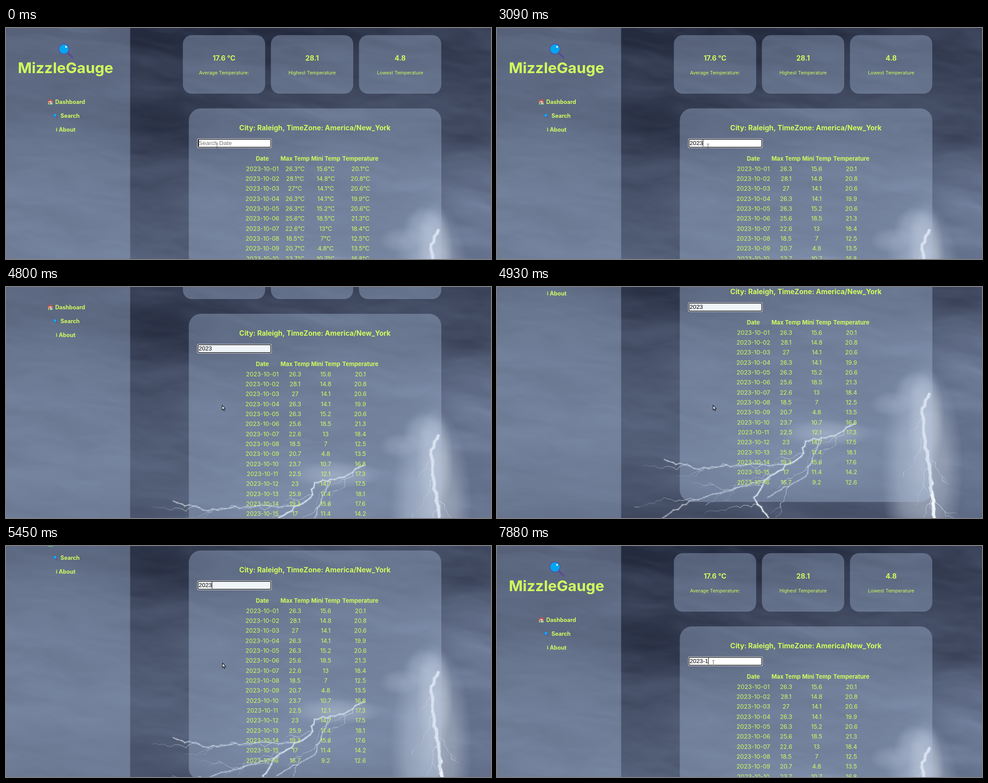
Write an HTML page with a canvas that moves like this. It is 1084 by 517 pixels and loops after 8 s.

```html
<!DOCTYPE html>
<html lang="en">
<head>
<meta charset="utf-8">
<title>MizzleGauge</title>
<style>
html, body { margin: 0; width: 100%; height: 100%; overflow: hidden; background: #39435c; }
canvas { display: block; }
</style>
</head>
<body>
<canvas id="stage" width="1084" height="517"></canvas>
<script>
const W = 1084, H = 517, PAGE_H = 730, LOOP = 8000;
const LIME = '#d2fc5e', GLASS = 'rgba(170,190,220,.37)';
const ctx = document.getElementById('stage').getContext('2d');
const page = document.createElement('canvas');
page.width = W;
page.height = PAGE_H;

// Maximum, minimum and mean of each day
const DAYS = `26.3 15.6 20.1, 28.1 14.8 20.8, 27 14.1 20.6, 26.3 14.1 19.9,
  26.3 15.2 20.6, 25.6 18.5 21.3, 22.6 13 18.4, 18.5 7 12.5,
  20.7 4.8 13.5, 23.7 10.7 16.8, 22.5 12.1 17.3, 23 14.7 17.5,
  25.9 11.4 18.1, 19.3 15.6 17.6, 17 11.4 14.2, 16.7 9.2 12.6`
  .split(',').map(day => day.trim().split(' '));
const COLUMNS = { 'Date': 573, 'Max Temp': 646, 'Mini Temp': 714.5, 'Temperature': 792 };

const TYPED = '2023-1';
const KEY_TIMES = [570, 720, 1250, 1960, 7620, 7880];
const CARET_FLIPS = [1810, 1960, 2520, 3090, 3630, 4150, 4660, 5170, 5600, 6150, 6670, 7190];
const MOVES = [
  { at: 0, scroll: 0, pointer: drawBeam, x: 471, y: 264 },
  { at: 4540, pointer: drawArrow, x: 476, y: 273 },
  { at: 4660, pointer: drawBeam, x: 483, y: 264 },
  { at: 4800, scroll: 120, pointer: drawArrow, y: 265 },
  { at: 4930, scroll: 213 },
  { at: 5450, scroll: 170, x: 484, y: 262 },
  { at: 5600, scroll: 0 },
  { at: 5900, pointer: drawBeam, y: 264 },
  { at: 6420, y: 262 },
  { at: 6940, x: 483, y: 261 }
];

let seed = 11;
const random = () => (seed = (seed * 16807) % 2147483647) / 2147483647;
const mix = (a, b, k) => a + (b - a) * k;
const ease = k => k * k * (3 - 2 * k);

function hash(x, y) {
  let n = Math.imul(x, 374761393) + Math.imul(y, 668265263);
  n = Math.imul(n ^ (n >>> 13), 1274126177);
  return ((n ^ (n >>> 16)) >>> 0) / 4294967296;
}

function noise(x, y) {
  const i = Math.floor(x), j = Math.floor(y), u = ease(x - i), v = ease(y - j);
  return mix(mix(hash(i, j), hash(i + 1, j), u), mix(hash(i, j + 1), hash(i + 1, j + 1), u), v) - .5;
}

// Brightness of the sky: lighter towards the middle and the right, with a few clouds
function skyTone(x, y) {
  const cloud = (cx, cy, rx, ry) => Math.exp(-(((x - cx) / rx) ** 2) - ((y - cy) / ry) ** 2);
  return .07 + .41 * Math.sin(Math.PI * y / 1000) ** 2 + .13 * (x / W) ** 2
    + .11 * cloud(720, 155, 330, 45)
    - .13 * cloud(340, 235, 130, 60)
    - .12 * cloud(1040, 240, 120, 40)
    + .2 * cloud(1050, 410, 130, 130)
    + .2 * cloud(630, 600, 220, 80)
    + .25 * cloud(1060, 690, 110, 110);
}

function paintSky(c) {
  const image = c.createImageData(W, PAGE_H);
  for (let y = 0, p = 0; y < PAGE_H; y++) {
    for (let x = 0; x < W; x++, p += 4) {
      const slant = y - x * .12 + 22 * noise(x / 80, y / 50);
      const wisps = noise(x / 150, slant / 34) * .17 + noise(x / 60, slant / 13) * .1 + noise(x / 24, slant / 7) * .05;
      const k = Math.max(0, skyTone(x, y) + wisps * mix(1, .6, y / PAGE_H));
      image.data[p] = mix(36, 128, k);
      image.data[p + 1] = mix(43, 143, k);
      image.data[p + 2] = mix(63, 173, k);
      image.data[p + 3] = 255;
    }
  }
  c.putImageData(image, 0, 0);
}

function glow(c, x, y, rx, ry, alpha) {
  const g = c.createRadialGradient(0, 0, 0, 0, 0, 1);
  g.addColorStop(0, `rgba(218,226,236,${alpha})`);
  g.addColorStop(.6, `rgba(205,214,228,${alpha * .6})`);
  g.addColorStop(1, 'rgba(190,202,222,0)');
  c.save();
  c.translate(x, y);
  c.scale(rx, ry);
  c.fillStyle = g;
  c.fillRect(-1, -1, 2, 2);
  c.restore();
}

function line(c, x0, y0, x1, y1, width, alpha) {
  c.lineCap = 'round';
  c.lineWidth = width;
  c.strokeStyle = `rgba(240,245,251,${alpha})`;
  c.beginPath();
  c.moveTo(x0, y0);
  c.lineTo(x1, y1);
  c.stroke();
}

// A thin arm that wanders, fades and sometimes splits
function arm(c, x, y, angle, length, alpha) {
  for (let left = length; left > 0; left -= 9) {
    const a = angle + (random() - .5) * 1.5;
    const nx = x + 9 * Math.cos(a), ny = y + 9 * Math.sin(a);
    line(c, x, y, nx, ny, .6 + left / length * .7, alpha * mix(.45, 1, left / length));
    [x, y] = [nx, ny];
    if (random() < .06) arm(c, x, y, angle + (random() - .5) * 1.6, left * .5, alpha * .7);
  }
}

// Jagged channel through key points; arms leave it in the direction `lean`
function bolt(c, points, width, alpha, lean, arms) {
  const joints = [];
  for (let i = 0; i + 1 < points.length; i++) {
    const [x0, y0] = points[i], [x1, y1] = points[i + 1];
    const n = Math.ceil(Math.hypot(x1 - x0, y1 - y0) / 11);
    for (let s = 0; s < n; s++) {
      const jitter = () => s ? (random() - .5) * 6 : 0;
      joints.push([mix(x0, x1, s / n) + jitter(), mix(y0, y1, s / n) + jitter()]);
    }
  }
  joints.push(points[points.length - 1]);
  for (let i = 1; i < joints.length; i++) {
    const w = width * mix(.8, 1.1, random());
    line(c, ...joints[i - 1], ...joints[i], w + 4, alpha * .16);
    line(c, ...joints[i - 1], ...joints[i], w, alpha);
  }
  for (let i = 0; i < arms; i++) {
    const [x, y] = joints[Math.floor((i + .7) / (arms + .5) * joints.length)];
    arm(c, x, y, lean + (random() - .5) * .7, 70 + random() * 70, .6);
  }
}

function paintLightning(c) {
  const { PI } = Math;
  glow(c, 950, 620, 92, 235, .62);
  glow(c, 958, 510, 42, 120, .6);
  glow(c, 935, 445, 48, 46, .35);
  glow(c, 885, 475, 52, 30, .28);
  glow(c, 735, 540, 105, 32, .4);

  bolt(c, [[800, 519], [755, 546], [690, 558]], 2.4, .8, PI * .6, 2);
  bolt(c, [[690, 558], [680, 592], [612, 635], [574, 684], [607, 730]], 2.6, .9, PI * .85, 4);
  bolt(c, [[648, 610], [535, 612], [440, 619], [374, 599]], 1.4, .7, PI, 3);
  bolt(c, [[610, 642], [500, 674], [430, 692], [370, 730]], 1.4, .7, PI * .9, 2);
  bolt(c, [[720, 556], [690, 637], [605, 684]], 1.4, .7, PI * .7, 2);

  const trunk = [[966, 453], [950, 485], [956, 550], [968, 630], [978, 730]];
  bolt(c, trunk, 6, 1, PI * .66, 4);
  bolt(c, trunk.slice(2), 4, .6, PI * .3, 3);
}

function box(c, x, y, w, h, r, fill) {
  c.fillStyle = fill;
  c.beginPath();
  c.roundRect(x, y, w, h, r);
  c.fill();
}

function disc(c, x, y, r, fill) {
  c.fillStyle = fill;
  c.beginPath();
  c.arc(x, y, r, 0, Math.PI * 2);
  c.fill();
}

function shape(c, fill, ...p) {
  c.fillStyle = fill;
  c.beginPath();
  for (let i = 0; i < p.length; i += 2) c.lineTo(p[i], p[i + 1]);
  c.closePath();
  c.fill();
}

// y is the middle of the capitals
function label(c, text, x, y, size, weight = 400, align = 'center') {
  c.font = `${weight} ${size}px Inter, sans-serif`;
  c.textAlign = align;
  c.fillStyle = LIME;
  c.fillText(text, x, y + size * .364);
}

function magnifier(c, x, y, r) {
  c.strokeStyle = '#5b4a92';
  c.lineCap = 'round';
  c.lineWidth = r * .3;
  c.beginPath();
  c.moveTo(x + r * .75, y + r * .75);
  c.lineTo(x + r * 1.55, y + r * 1.55);
  c.stroke();
  disc(c, x, y, r, '#5b4fa0');
  disc(c, x, y, r * .84, '#00a6ed');
  disc(c, x + r * .38, y - r * .38, r * .17, '#e8f6ff');
}

function house(c, x, y) {
  box(c, x - 6, y + 4, 12, 2, 1, '#35c06a');
  box(c, x - 4.5, y - 2, 9, 7, 0, '#f3d9b8');
  box(c, x + 2.5, y - 5, 2, 4, 0, '#b8604a');
  shape(c, '#f0483e', x, y - 6.5, x + 6.5, y, x + 5, y + 1, x, y - 4, x - 5, y + 1, x - 6.5, y);
  box(c, x - 3, y, 2.5, 5, 0, '#9b5b48');
  box(c, x + 1, y, 2.5, 2.5, 0, '#3a9be0');
}

function paintSidebar(c) {
  box(c, 0, 0, 277.5, PAGE_H, 0, GLASS);
  magnifier(c, 129.5, 47, 12.5);
  label(c, 'MizzleGauge', 133, 88.5, 33.33, 700);
  house(c, 99, 165.5);
  label(c, 'Dashboard', 110, 165.5, 12.5, 700, 'left');
  magnifier(c, 109, 195.5, 3.8);
  label(c, 'Search', 121.7, 196.5, 12.5, 700, 'left');
  label(c, 'About', 118, 227.3, 12.5, 700, 'left');
  c.font = 'bold 10px "Noto Serif", serif';
  c.textAlign = 'center';
  c.fillText('i', 113.3, 231);
}

function paintPage(c) {
  paintSky(c);
  paintLightning(c);
  paintSidebar(c);

  const cards = [['17.6 °C', 'Average Temperature:'], ['28.1', 'Highest Temperature'], ['4.8', 'Lowest Temperature']];
  cards.forEach(([value, name], i) => {
    const x = 395.3 + i * 196.8;
    box(c, x, 16, 184, 131, 20, GLASS);
    label(c, value, x + 92, 67.3, 15.6, 700);
    label(c, name, x + 92, 100.5, 10.67);
  });

  box(c, 408.5, 180, 564.5, 514, 27, GLASS);
  label(c, 'City: Raleigh, TimeZone: America/New_York', 690.5, 223.5, 15.6, 700);
  for (const name in COLUMNS) label(c, name, COLUMNS[name], 292.8, 12.9, 700);
}

function drawTable(unit) {
  const centers = Object.values(COLUMNS);
  DAYS.forEach((values, i) => {
    const date = '2023-10-' + String(i + 1).padStart(2, '0');
    const cells = [date, ...values.map(value => value + unit)];
    cells.forEach((cell, j) => label(ctx, cell, centers[j], 314.8 + i * 22.33, 13.33));
  });
}

function drawInput({ text, caret, scroll }) {
  const left = 430.6;
  box(ctx, 427.5, 247.5, 166, 21, 3, '#fff');
  box(ctx, 428.5, 248.5, 164, 19, 2, '#101216');
  box(ctx, 430, 250, 161, 16, 1, scroll ? '#f0f5f9' : '#fff');
  ctx.font = '13.333px "Liberation Sans", Arial, sans-serif';
  ctx.textAlign = 'left';
  ctx.fillStyle = text ? '#000' : '#757575';
  ctx.fillText(text || 'Search Date', left, 262);
  if (caret) {
    ctx.fillStyle = '#000';
    ctx.fillRect(Math.floor(left + ctx.measureText(text).width), 250, 1, 15);
  }
}

function drawBeam(x, y) {
  ctx.fillStyle = '#555';
  ctx.fillRect(x, y - 4, 1, 9);
  for (const edge of [y - 5, y + 5]) {
    ctx.fillRect(x - 2, edge, 2, 1);
    ctx.fillRect(x + 1, edge, 2, 1);
  }
}

function drawArrow(x, y) {
  ctx.save();
  ctx.translate(x, y);
  ctx.strokeStyle = '#15181f';
  ctx.lineWidth = 1.2;
  shape(ctx, '#fff', 0, 0, 0, 10, 2.3, 8, 4, 12, 5.6, 11.3, 4, 7.5, 7, 7.3);
  ctx.stroke();
  ctx.restore();
}

function stateAt(time) {
  const passed = times => times.filter(t => t <= time).length;
  return Object.assign({
    text: TYPED.slice(0, passed(KEY_TIMES)),
    caret: passed(CARET_FLIPS) % 2 === 0
  }, ...MOVES.filter(move => move.at <= time));
}

function render(time) {
  const state = stateAt(time);
  ctx.save();
  ctx.translate(0, -state.scroll);
  ctx.drawImage(page, 0, 0);
  drawTable(state.text ? '' : '°C');
  drawInput(state);
  ctx.restore();
  state.pointer(state.x, state.y);
}

paintPage(page.getContext('2d'));
const origin = performance.now();

function tick() {
  render((performance.now() - origin) % LOOP);
  requestAnimationFrame(tick);
}
tick();
</script>
</body>
</html>
```
